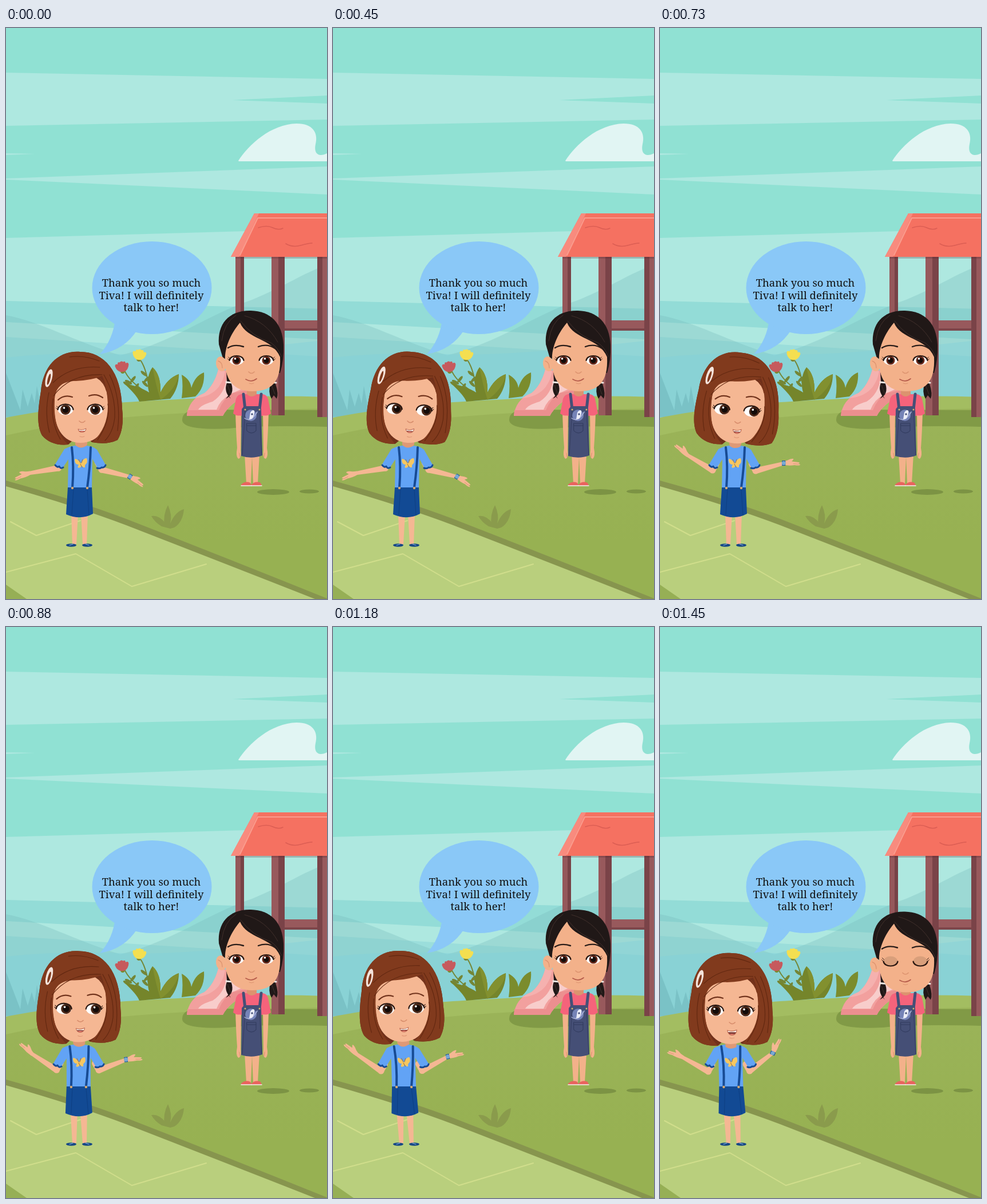
Animation of 561x998 px, one loop 1520 ms. Source, as an HTML page with a canvas:

```html
<!DOCTYPE html>
<html lang="en">
<head>
<meta charset="utf-8">
<title>Playground chat</title>
<style>
html, body { margin: 0; width: 100%; height: 100%; overflow: hidden; background: #90e1d4; }
canvas { display: block; }
</style>
</head>
<body>
<canvas id="stage" width="561" height="998"></canvas>
<script>
const g = document.getElementById('stage').getContext('2d');
const LOOP = 1520;

const fill = (d, c) => { g.fillStyle = c; g.fill(new Path2D(d)); };
const line = (d, c, w = 1) => { g.strokeStyle = c; g.lineWidth = w; g.stroke(new Path2D(d)); };
const rect = (x, y, w, h, c) => { g.fillStyle = c; g.fillRect(x, y, w, h); };
const oval = (x, y, rx, ry, c, turn = 0) => {
  g.fillStyle = c;
  g.beginPath();
  g.ellipse(x, y, rx, ry, turn, 0, 7);
  g.fill();
};
const group = draw => { g.save(); draw(); g.restore(); };
const rad = a => a * Math.PI / 180;
const shade = (y0, y1, a, b) => {
  const s = g.createLinearGradient(0, y0, 0, y1);
  s.addColorStop(0, a);
  s.addColorStop(1, b);
  return s;
};

// Values between keys ease in and out.
function sample(keys, t) {
  const i = keys.findIndex(k => k[0] >= t);
  if (i < 0) return keys[keys.length - 1];
  if (i === 0) return keys[0];
  const a = keys[i - 1], b = keys[i];
  const u = (t - a[0]) / (b[0] - a[0]), e = u * u * (3 - 2 * u);
  return a.map((v, n) => v + (b[n] - v) * e);
}

// time, tilt, lean, drop, look, mouth, left arm, left hand, right arm, right hand, elbow
const POSE = [
  [0, 0, 0, 0, 0, .35, -10, -20, -14, -33, 0],
  [240, 2, 0, 1, 4.5, .9, -10, -20, -14, -33, 0],
  [450, 3.2, 0, 0, 4.5, .5, -10, -20, -14, -33, 0],
  [730, 4.2, 0, 1, 4.5, .55, 31, 42, 15, 0, 4],
  [1060, -4, -8, 0, 3, .7, 36, 46, 29, 13, 7],
  [1300, 0, -8, 0, 0, .5, 33, 39, 28, 14, 7],
  [1450, 1, -7.5, 4, 0, .9, 29, 23, 38, 65, 8]
];
const BLINK = [[0, 0], [110, 0], [190, 1], [240, .55], [310, 0]];
const FRIEND_BLINK = [[0, 0], [1320, 0], [1450, 1]];

function sky() {
  rect(0, 0, 561, 998, '#90e1d3');
  fill('M0 78L561 89V160L0 171Z', '#aee8e0');
  fill('M395 126L561 118V132Z', '#90e1d3');
  fill('M0 219L50 220L0 222Z', '#aee8e0');
  fill('M0 263L561 242V291L0 265Z', '#aee8e0');
  fill('M0 367L561 351V700H0Z', '#aee8e0');
  fill('M0 477L561 491V545L0 514Z', '#93dcd7');
  fill('M0 540L561 575V700H0Z', '#9bdedb');
  fill('M406 232C424 204 463 168 508 167C536 167 546 183 541 203C537 223 550 225 561 219V233H407Z', '#e1f5f3');
  fill('M0 502C60 513 120 548 200 572C290 550 350 502 430 475C490 450 520 428 561 414V700H0Z', 'rgba(120,188,188,.34)');
  fill('M0 576Q100 565 200 570T561 545V700H0Z', 'rgba(128,207,216,.42)');
  fill('M0 603L25 668L29 632L38 662L45 638L50 656L54 626L64 680H0Z', 'rgba(112,183,188,.6)');
}

function ground() {
  fill('M0 681C110 660 190 654 320 648Q440 641 561 645V998H0Z', '#a3bd61');
  fill('M0 712C130 682 270 674 420 668L561 665V998H0Z', shade(690, 900, '#9ab358', '#97b152'));
  fill('M308 684Q309 667 340 667L561 668V697Q440 694 390 700Q306 704 308 684Z', '#819a46');
  fill('M0 791Q120 824 210 858Q390 928 561 997V998H0Z', '#87954e');
  fill('M0 801Q120 835 210 869Q390 939 540 998H0Z', '#b9cf7d');
  line('M8 863L53 887L130 861M0 951L122 919L220 976L350 937', '#d1de8c', 2);
  fill('M0 973L36 998H0Z', '#96af55');
  oval(467, 811, 28, 5, '#7c9344');
  oval(530, 810, 17, 3.5, '#7c9344');
  fill('M277 872Q274 850 283 834Q291 851 287 866Q296 845 311 841Q309 864 294 873L287 875L272 871Q260 864 254 853Q268 851 279 866Z', '#8a9b4c');
}

function flower(x, y, c, turn) {
  group(() => {
    g.translate(x, y);
    g.rotate(turn);
    oval(0, 7, 4, 4, '#7e8730');
    fill('M-12 -3Q-12 -8 -7 -6Q-7 -11 -3 -9Q0 -12 3 -9Q7 -11 7 -6Q12 -8 12 -3Q10 6 3 8H-3Q-10 6 -12 -3Z', c);
  });
}

function plants() {
  line('M207 598Q214 617 247 638M236 582Q247 600 250 633', '#748636', 2);
  for (const [x, y, a] of [[214, 619, .5], [222, 614, -.9], [228, 627, -1], [241, 604, .7], [246, 614, -.8], [243, 622, .8], [211, 622, .5]])
    oval(x, y, 7, 2.5, '#748636', a);
  fill('M206 621Q235 627 250 637Q244 609 256 593Q271 606 270 637Q282 612 302 605Q302 630 287 648L233 653Q229 642 206 621Z', '#75852b');
  fill('M256 593Q271 606 270 637Q282 612 302 605Q298 630 270 650Q262 625 256 593Z', '#82902f');
  fill('M307 606Q322 614 324 629Q330 608 346 602Q348 628 331 644L307 647Q310 626 307 606Z', '#7b8c2d');
  flower(203, 593, '#c65a5d', -.15);
  flower(233, 572, '#f4df50', .1);
}

function playhouse() {
  const post = (x, w, h, split, a, b) => {
    rect(x, 400, w, h, a);
    rect(x + split, 400, w - split, h, b);
  };
  post(401, 15, 230, 9, '#95575a', '#774246');
  rect(470, 511, 91, 17, '#98595c');
  rect(470, 525, 91, 4, '#7d464a');
  post(464, 23, 277, 12, '#98595c', '#7a4348');
  post(544, 17, 280, 9, '#7a4348', '#98595c');
  rect(401, 400, 160, 3, 'rgba(80,35,40,.25)');
  fill('M393 400L434 324H561V400Z', '#f57161');
  fill('M393 400L434 324H442L407 400Z', '#f88b7e');
  line('M409 397L440 332H561', '#fa9c8e', 2);
  line('M441 349Q456 344 466 349T484 350M489 377Q501 384 515 380T535 376', '#db5d53', 1.5);

  fill('M371 597Q364 624 347 638Q319 649 316 678H379Q390 656 425 640L414 602Z', '#f2a09e');
  fill('M386 610Q382 640 361 653Q340 659 336 667H368Q374 650 392 640L414 630V610Z', '#f8cdcb');
  fill('M371 597Q364 624 347 638Q337 642 330 647Q358 645 372 627Q381 614 383 600Z', '#f5b1af');
  fill('M316 678L317 668H372Q380 648 396 638L425 632V640Q390 656 379 678Z', '#ec8f8f');
}

function bubble() {
  fill('M191 508Q187 545 164 570Q207 563 229 528Z', '#8ac8f7');
  oval(255, 454, 104.5, 81, '#8ac8f7');
  g.fillStyle = '#111';
  g.font = '18.5px "Noto Serif", serif';
  g.textAlign = 'center';
  ['Thank you so much', 'Tiva! I will definitely', 'talk to her!'].forEach((s, i) => g.fillText(s, 254, 452 + i * 21.5));
}

function eye(x, y, rx, ry, look, lid, iris, lidColor, outer) {
  const l = x - rx, r = x + rx, inset = rx * .12;
  const arc = (from, to, dir, depth) => `C${from + dir * inset} ${y + depth} ${to - dir * inset} ${y + depth} ${to} ${y}`;
  const lash = `M${l} ${y}` + arc(l, r, 1, 1.33 * ry * (2 * lid - 1));
  const lower = arc(r, l, -1, 1.33 * ry) + 'Z';
  fill(`M${l} ${y}` + arc(l, r, 1, -1.5 * ry) + lower, lidColor);
  group(() => {
    g.clip(new Path2D(lash + lower));
    rect(l, y - 2 * ry, 2 * rx, 4 * ry, '#fff');
    oval(x + look, y, ry * .94, ry * .94, iris);
    oval(x + look, y, ry * .6, ry * .6, '#130b09');
    oval(x + look - 2.5, y - 3, 1.8, 1.8, '#fff');
  });
  line(lash, '#2a1711', 2.2);
  const tip = x + outer * rx;
  line(`M${tip} ${y}l${outer * 3} -3M${tip - outer} ${y - 3}l${outer * 3} -3`, '#2a1711', 1);
}

function friend(t) {
  const lid = sample(FRIEND_BLINK, t)[1], skin = '#f3b18a', dark = '#dc936f';
  fill('M417 745L420 796H428L430 750L432 796H440L443 745Z', skin);
  for (const x of [420, 438]) {
    fill(`M${x - 9} 798Q${x - 2} 791 ${x + 7} 795L${x + 9} 800H${x - 9}Z`, '#e9635e');
    line(`M${x - 9} 800H${x + 9}`, '#f5eeee', 1.5);
  }
  for (const s of [-1, 1]) group(() => {
    g.translate(430, 0);
    g.scale(s, 1);
    fill('M19 672L29 672Q28 707 26 734Q29 749 24 753Q18 752 20 738Z', skin);
    line('M22 743l-1 7', dark);
    fill('M12 640Q25 638 28 648L33 674Q25 680 17 676L12 660Z', '#f5637b');
  });
  rect(410, 640, 39, 38, '#f5637b');
  fill('M421 628H438V640Q429 648 421 640Z', dark);
  fill('M412 666L416 661H443L446 666L448 747Q430 754 411 748Z', '#454f76');
  line('M415 640L418 667M446 640L443 667', '#454f76', 5);
  line('M418 668L413 746M443 668L447 746', '#343d61');
  oval(428, 677, 10, 10, '#7583b7');
  line('M417 682Q428 690 439 671', '#a9b2d8', 1.5);
  fill('M425 684L427 672Q431 666 434 669Q435 676 430 683Z', '#eceef8');
  oval(430, 675, 1.7, 1.7, '#454f76');
  line('M421 691H437V704Q429 712 421 704Z M421 695H437', '#303a5d');
  oval(418, 667, 1.5, 1.5, '#d1b46d');
  oval(443, 667, 1.5, 1.5, '#d1b46d');

  group(() => {
    g.translate(0, lid * 3.5);
    for (const [x, s] of [[390, -1], [467, 1]]) {
      fill(`M${x - 5} 598L${x + 7} 600L${x + 4} 622Q${x + 10} 640 ${x + s * 6} 648L${x + s} 642L${x - s * 3} 648Q${x - 10} 636 ${x - 4} 620Z`, '#201817');
      line(`M${x - 5} 619l10 1`, '#eee9e5', 3);
      line(`M${x - 3} 624l6 16`, '#403330');
    }
    fill('M428 494C390 493 369 517 372 553L379 577L479 603Q486 580 485 554C483 515 462 495 428 494Z', '#201817');
    oval(376, 587, 9, 13, skin, -.15);
    line('M371 582Q378 584 378 594', dark, 1.3);
    fill('M383 572C386 546 399 527 409 515C421 545 465 541 479 575C481 619 464 635 430 635C399 635 380 616 383 572Z', skin);
    line('M410 512Q431 540 463 550Q475 558 481 574M417 503Q455 513 475 549M402 502Q381 515 377 547', '#41302c');
    line('M388 559Q399 552 415 557M441 557Q457 551 470 560', '#2a1d19', 2.4);
    eye(403, 581, 12.5, 8, 0, lid, '#6b2a1b', '#d99f7b', -1);
    eye(455, 581, 12.5, 8, 0, lid, '#6b2a1b', '#d99f7b', 1);
    line('M424 601Q429 606 434 601', dark, 1.7);
    line('M419 614Q429 620 438 613', '#b75d4c', 1.7);
    line('M425 621Q429 623 433 621', dark);
  });
}

function arm(x, y, side, bend, wrist, skin) {
  group(() => {
    g.translate(x, y);
    g.scale(side, 1);
    line('M-7 -12L0 0', skin, 10);
    oval(0, 0, 5.5, 5.5, skin);
    g.rotate(-rad(bend));
    fill('M-1 -5.5L53 -3V3L-1 5.5Z', skin);
    g.translate(52, 0);
    g.rotate(rad(bend - wrist));
    fill('M-2 -3Q5 -4 10 -7Q17 -9 16 -6.5L13 -3L25 -1.5Q29 0 24 1L28 2.5Q27 5 18 3.5Q8 5 -2 3Z', skin);
    line('M16 1L24 1.7', '#d79370', .8);
    if (side > 0) {
      fill('M-4 -4.5H2V4.5H-4Z', '#245a9c');
      oval(-1, 0, 3.5, 3.5, '#78a9d2');
    }
  });
}

function girlBody(lean, p, skin) {
  const [, , , , , , la, lh, ra, rh, drop] = p;
  arm(92 + lean, 769 + drop, -1, la, lh, skin);
  arm(167 + lean * 1.4, 772 + drop * .5, 1, ra, rh, skin);
  group(() => {
    const k = lean / 165;
    g.transform(1, 0, -k, 1, k * 905, 0);
    fill('M114 849H126L123 902H116ZM131 849H143L141 902H134Z', skin);
    for (const [x, s] of [[114, -1], [142, 1]]) {
      oval(x, 904, 9, 2.7, '#174885');
      line(`M${x - s * 3} 902l${s * 6} 2`, '#8bb4e0');
    }
    fill('M102 736Q118 728 130 730Q149 728 159 737L175 765Q168 771 160 769L151 753L150 805H108L109 754L99 769Q92 770 85 764Z', '#62a3f5');
    line('M86 764q4 5 7 2q2 5 7 2M159 769q5 2 8 -1q5 1 7 -4', '#174b94', 3);
    fill('M121 728Q130 739 142 728V720H121Z', '#df9976');
    line('M115 733Q119 766 116 803M148 733Q147 768 142 803', '#174b94', 4);
    fill('M131 761Q121 749 120 755Q121 764 127 763Q123 771 130 768L132 765Q139 772 138 764Q144 759 141 752Q136 751 131 761Z', '#f6c761');
    line('M130 762l3 6M130 760l-3 -6M132 760l2 -6', '#a77436');
    fill('M108 803H150L152 849Q130 861 105 850Z', '#124a94');
    line('M118 806L115 851M142 806L145 851', '#0e3f82');
    oval(116, 804, 2.2, 2.2, '#d4a872');
    oval(142, 804, 2.2, 2.2, '#d4a872');
  });
}

function girlHead(t, p, skin) {
  const [, tilt, lean, drop, look, open] = p, lid = sample(BLINK, t)[1];
  const crown = 'M130 566C92 563 65 590 61 635C55 672 54 695 63 712Q79 731 109 728';
  const side = 'Q177 729 195 720Q207 700 203 666C202 600 171 566 130 566Z';
  group(() => {
    g.translate(130 + lean, 725 + drop);
    g.rotate(rad(tilt));
    g.translate(-130, -725);
    fill(crown + 'L124 714H140L150 724' + side, '#70301a');
    fill('M122 708H141V730Q131 736 122 730Z', '#df9976');
    fill('M85 648Q85 605 130 605Q174 605 178 648C182 700 162 725 130 725C100 725 80 698 85 648Z', skin);
    // front hair
    fill(crown + 'C90 711 83 684 85 648C87 627 99 617 122 617Q149 616 168 608Q177 626 178 661Q178 699 151 724' + side, '#813a1d');
    line('M168 606Q112 604 83 643M164 593Q114 589 82 620M163 582Q136 571 111 575M171 606Q192 642 190 681Q187 707 173 721M181 606Q202 648 195 704M75 637Q67 673 76 707M82 648Q77 687 95 719M178 657Q183 686 160 720', '#612710', 1.1);
    line('M165 613Q172 621 175 633', '#813a1d', 1);
    group(() => {
      g.translate(75 + look * .7, 612 - look * .5);
      g.rotate(.25);
      oval(0, 0, 5.5, 16, '#f5e4dc');
      oval(.5, 2, 2.2, 10, '#813a1d');
    });
    line('M91 650Q102 640 116 645M145 643Q158 638 169 646', '#71331c', 2.2);
    eye(104, 667, 13.5, 9.5, look, lid, '#4b2818', '#d89a79', -1);
    eye(156, 667, 13.5, 9.5, look, lid, '#4b2818', '#d89a79', 1);
    line('M128 687Q133 692 138 687', '#d88e6d', 1.7);
    const w = 6 + 2.5 * open, h = 5 + 7 * open, l = 133 - w, r = 133 + w;
    const mouth = `M${l} 701Q133 704 ${r} 700C${r} ${700 + h} ${l + 2} ${702 + h} ${l} 701Z`;
    group(() => {
      g.clip(new Path2D(mouth));
      rect(120, 695, 27, 22, '#803a34');
      rect(120, 697, 27, 7, '#fff8ef');
      oval(133, 701 + h * .7, 5, 2, '#e57d70');
    });
    line(mouth, '#bf6c56', 1.1);
    line('M129 714Q133 716 137 714', '#dc9473');
  });
}

function render(ms) {
  const t = ms < 520 ? Math.min(450, Math.floor(ms / 30) * 30)
    : Math.min(1450, 520 + Math.floor((ms - 520) / 30) * 30);
  const p = sample(POSE, t), skin = '#f5b793';
  g.lineCap = g.lineJoin = 'round';
  sky();
  ground();
  plants();
  playhouse();
  bubble();
  friend(t);
  girlBody(p[2], p, skin);
  girlHead(t, p, skin);
}

const start = performance.now();
function tick() {
  render((performance.now() - start) % LOOP);
  requestAnimationFrame(tick);
}
tick();
</script>
</body>
</html>
```
